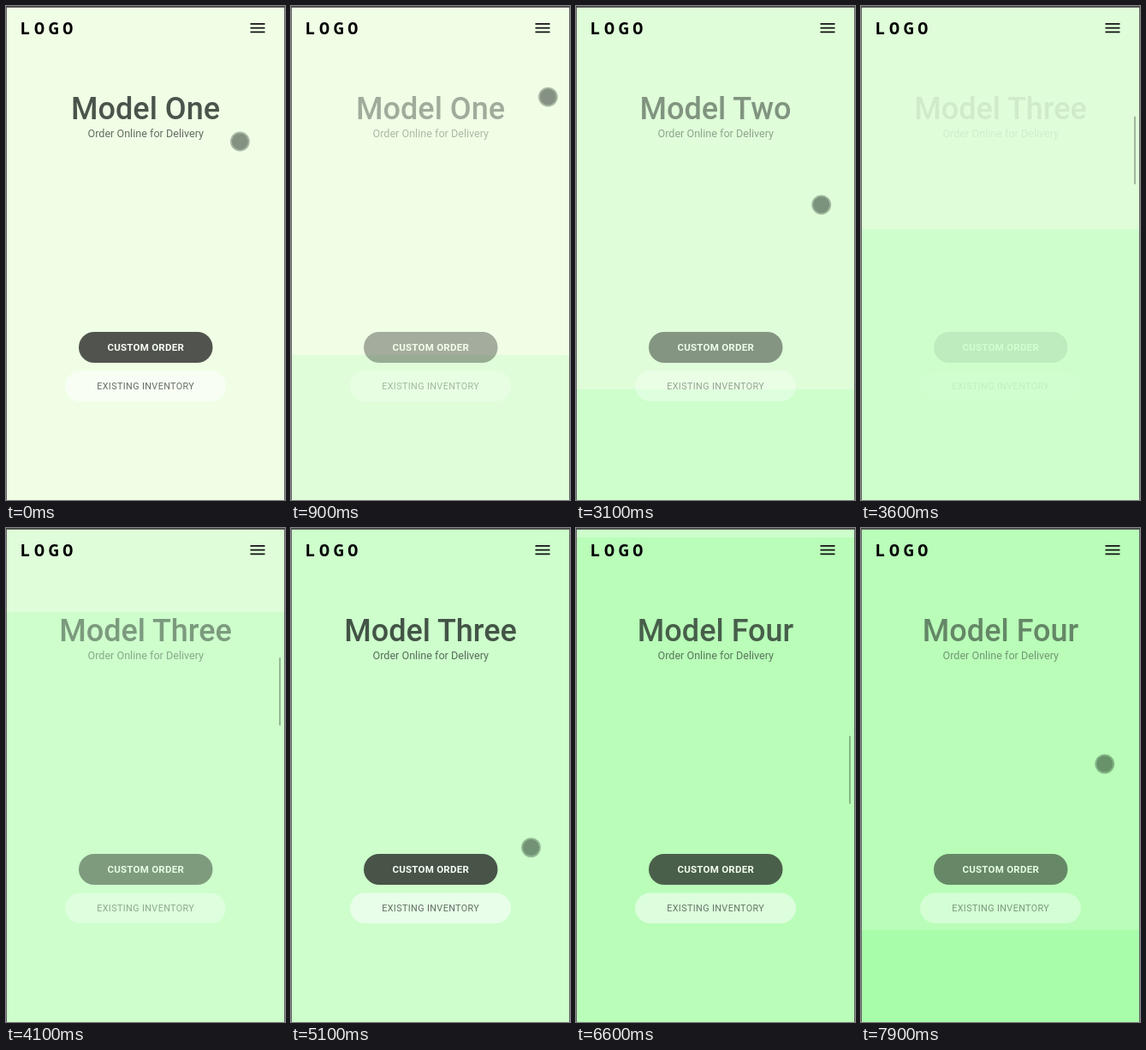
An HTML page that plays this animation: 326 by 576 pixels, repeating every 8 s.

```html
<!DOCTYPE html>
<html lang="en">
<head>
<meta charset="utf-8">
<title>Model pages</title>
<style>
html, body { margin: 0; width: 100%; height: 100%; overflow: hidden; }
svg { display: block; }
text { font-family: Roboto, sans-serif; text-anchor: middle; fill: rgba(32, 41, 36, .68); }
#title { font-size: 36px; font-weight: 500; fill: rgba(32, 41, 36, .8); }
#tagline { font-size: 12.6px; }
#custom { font-size: 11.5px; font-weight: 700; letter-spacing: .25px; fill: #f8fff5; }
#existing { font-size: 10.8px; letter-spacing: .38px; }
#logo { font: 700 20px "Noto Sans Mono", monospace; letter-spacing: 4.6px; text-anchor: start; fill: #000; }
</style>
</head>
<body>
<svg width="326" height="576">
  <rect id="page" width="326" height="576"/>
  <rect id="nextPage" width="326" height="576"/>
  <g id="content">
    <text id="title" x="163" y="132"></text>
    <text id="tagline" x="163.3" y="153">Order Online for Delivery</text>
    <rect x="85" y="380" width="156.5" height="36" rx="18" fill="rgba(26,26,26,.74)"/>
    <text id="custom" x="163.2" y="402">CUSTOM ORDER</text>
    <rect x="69" y="425.5" width="188" height="35.5" rx="17.75" fill="rgba(255,255,255,.55)"/>
    <text id="existing" x="163.2" y="447">EXISTING INVENTORY</text>
  </g>
  <text id="logo" x="16.5" y="33">LOGO</text>
  <path d="M285.5 20.9h17m-17 4.7h17m-17 4.7h17" stroke="#111" stroke-width="1.8"/>
  <rect id="scrollbar" x="319" width="2" height="79.5" rx="1" fill="rgba(0,0,0,.28)"/>
  <path d="M.5 0v576M325.5 0v576" stroke="#666"/>
  <rect width="326" height="1.8" fill="#444"/>
  <g id="pointer">
    <circle id="ring"/>
    <circle id="core"/>
  </g>
</svg>
<script>
const LOOP = 8000, PAGE = 574;
const SHADES = ['#f0fee6', '#dffdd9', '#cdfecc', '#b9fdb9', '#a8fdab'];
const NAMES = ['One', 'Two', 'Three', 'Four', 'Five'];

const SPEED = 0.53;      // finger speed while dragging, px per ms
const LIFT_Y = 45;       // the finger lets go here
const HIDDEN_Y = -20;    // and rests here, above the stage
const SNAP_WAIT = 295, SNAP_TIME = 600;
const RETURN_TIME = 865, REST_TIME = 210;
const FADE_LAG = 35;

// Each swipe: when and where the finger presses, and how far it leans right per px upward
const swipes = [
  { press: 583, x: 273.4, y: 274.6, lean: 0.16 },
  { press: 2858, x: 277.7, y: 360.6, lean: 0.07 },
  { press: 5155, x: 280.5, y: 372.6, lean: 0.02 },
  { press: 7700, x: 280.5, y: 381.6, lean: 0.04 }
].map(s => ({
  ...s,
  release: s.press + (s.y - LIFT_Y) / SPEED,
  exit: s.press + (s.y - HIDDEN_Y) / SPEED
}));

const $ = id => document.getElementById(id);
const clamp = v => Math.max(0, Math.min(1, v));
const smooth = v => v * v * (3 - 2 * v);

function set(id, attrs) {
  for (const name in attrs) $(id).setAttribute(name, attrs[name]);
}

// Every swipe drags the page with the finger, then snaps through the rest of it
function scrollAt(t) {
  let scroll = 0;
  for (const { press, release } of swipes) {
    const drag = SPEED * Math.max(0, Math.min(t, release) - press);
    const snap = smooth(clamp((t - release - SNAP_WAIT) / SNAP_TIME));
    scroll += drag + (PAGE - drag) * snap;
  }
  return Math.round(scroll);
}

function drawPages(t) {
  const scroll = scrollAt(t);
  const page = Math.floor(scroll / PAGE);
  set('page', { fill: SHADES[page] });
  set('nextPage', { fill: SHADES[page + 1], y: 576 - scroll % PAGE });

  // Text stays in place and is invisible halfway between two pages
  const place = scrollAt(t - FADE_LAG) / PAGE;
  const nearest = Math.round(place);
  $('title').textContent = 'Model ' + NAMES[nearest];
  set('content', { opacity: 1 - 2 * Math.abs(place - nearest) });

  const shown = swipes.map(({ release }) => Math.min(
    clamp((t - release) / 100),
    clamp((release + SNAP_WAIT + SNAP_TIME + 500 - t) / 200)
  ));
  set('scrollbar', { y: 5.8 + scroll * 0.138, opacity: Math.max(...shown) });
}

function drawPointer(t) {
  const { press, x, y, lean } = swipes.find(s => t < s.exit);
  const rise = SPEED * Math.max(0, t - press);
  const arrival = smooth(clamp((t - press + REST_TIME + RETURN_TIME) / RETURN_TIME));
  const top = HIDDEN_Y + (y - HIDDEN_Y) * arrival - rise;
  set('pointer', { transform: `translate(${x + lean * rise} ${top})` });

  const outside = top < 2;
  set('ring', { r: outside ? 8 : 11.4, fill: outside ? '#444' : 'rgba(5,20,12,.3)' });
  set('core', { r: outside ? 7 : 9.5, fill: outside ? '#fff' : 'rgba(5,20,12,.22)' });
}

const began = performance.now();
function tick() {
  const t = (performance.now() - began) % LOOP;
  drawPages(t);
  drawPointer(t);
  requestAnimationFrame(tick);
}
tick();
</script>
</body>
</html>
```
